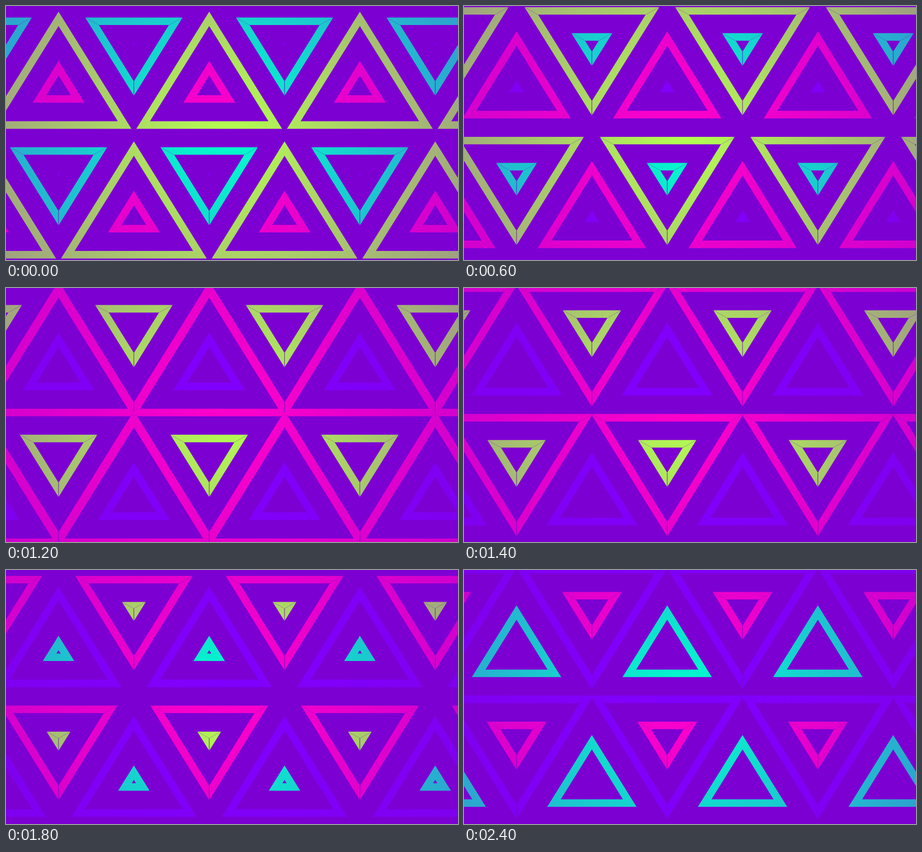
An HTML page for the animation above (2500 ms loop, 998 by 561 pixels).

```html
<!DOCTYPE html>
<html lang="en">
<head>
<meta charset="utf-8">
<title>Triangle waves</title>
<style>
  html, body { margin: 0; width: 100%; height: 100%; overflow: hidden; background: #7d00d3; }
  svg { display: block; width: 100vw; height: 100vh; }
</style>
</head>
<body>
<svg id="stage" viewBox="0 0 998 561" preserveAspectRatio="none">
  <defs>
    <radialGradient id="fade" gradientUnits="userSpaceOnUse" cx="490" cy="285" r="600">
      <stop offset="0" stop-color="#7d00d3" stop-opacity="0"/>
      <stop offset="1" stop-color="#7d00d3" stop-opacity=".39"/>
    </radialGradient>
  </defs>
  <rect width="998" height="561" fill="#7d00d3"/>
  <g id="bands"></g>
  <path id="mitres" fill="none" stroke="#6a10c8" stroke-width=".8" stroke-opacity=".5"/>
  <path id="spines" fill="none" stroke="#6a10c8" stroke-width="1.3" stroke-opacity=".85"/>
  <rect width="998" height="561" fill="url(#fade)"/>
</svg>
<script>
const LOOP = 2500, STEP = 100;
const PITCH_X = 332.67, PITCH_Y = 286.5;
const SLOPE = 0.622;                           // half width / height
const APEX = Math.hypot(1, SLOPE) / SLOPE;     // apex distance per unit of inradius
const HALF = SLOPE * (1 + APEX);               // half base per unit of inradius
const THICK = 16.7, GAP = 57.6;
const EDGE = 95;                               // inradius where a wave crosses into the next cell
const COLORS = ['#ff00cb', '#b4ff50', '#00ffcd', '#8000ff'];

// Wave front of the magenta band: [ms, distance from the cell centre]
const FRONT = [[0, 31.8], [300, 49.1], [600, 66.4], [900, 83.9],
               [1400, 113.3], [1800, 134.5], [2400, 170]];

const $ = id => document.getElementById(id);
const ups = [], downs = [];
for (let row = 0; row < 2; row++) {
  for (let col = -1; col < 4; col++) {
    const x = 116 + col * PITCH_X, shift = PITCH_X / 2;
    ups.push([x + row * shift, 181.8 + row * PITCH_Y]);
    downs.push([x + (1 - row) * shift, 85.1 + row * PITCH_Y]);
  }
}

const makePath = color => {
  const path = document.createElementNS('http://www.w3.org/2000/svg', 'path');
  path.setAttribute('fill', color);
  return $('bands').appendChild(path);
};
const layers = [];
for (let k = -3; k <= 3; k++) {
  const color = COLORS[(k + 4) % 4];
  layers.push({ offset: k * GAP, up: makePath(color), down: makePath(color) });
}

const frontAt = ms => {
  const i = Math.max(1, FRONT.findIndex(([t]) => t >= ms));
  const [t0, a] = FRONT[i - 1], [t1, b] = FRONT[i];
  return a + (b - a) * (ms - t0) / (t1 - t0);
};

// dir is 1 for a triangle pointing up, -1 for one pointing down
const corners = ([x, y], r, dir) => [
  [x, y - dir * APEX * r],
  [x + HALF * r, y + dir * r],
  [x - HALF * r, y + dir * r]
];
const line = points => 'M' + points.map(p => p.map(v => v.toFixed(2))).join('L');

function ring(cell, inner, outer, dir) {
  if (outer <= inner) return '';
  const hole = inner > 0 ? line(corners(cell, inner, dir).reverse()) + 'Z' : '';
  return line(corners(cell, outer, dir)) + 'Z' + hole;
}

function draw(ms) {
  const front = frontAt(ms);
  let mitres = '', spines = '';
  for (const { offset, up, down } of layers) {
    const p = front + offset;
    const upOuter = Math.min(p, EDGE), upInner = Math.max(p - THICK, 0);
    const downOuter = Math.min(2 * EDGE - p + THICK, 100), downInner = Math.max(2 * EDGE - p, 0);
    up.setAttribute('d', ups.map(c => ring(c, upInner, upOuter, 1)).join(''));
    down.setAttribute('d', downs.map(c => ring(c, downInner, downOuter, -1)).join(''));

    if (downOuter <= downInner || downOuter < 4) continue;
    const seamOuter = Math.min(downOuter, PITCH_X / 2 / HALF);
    for (const cell of downs) {
      const inside = corners(cell, downInner, -1);
      spines += line([inside[0], corners(cell, downOuter, -1)[0]]);
      if (seamOuter <= downInner) continue;
      const outside = corners(cell, seamOuter, -1);
      mitres += line([inside[1], outside[1]]) + line([inside[2], outside[2]]);
    }
  }
  $('mitres').setAttribute('d', mitres);
  $('spines').setAttribute('d', spines);
}

const start = performance.now();
function tick() {
  const ms = (performance.now() - start) % LOOP;
  draw(Math.floor(ms / STEP) * STEP);
  requestAnimationFrame(tick);
}
tick();
</script>
</body>
</html>
```
